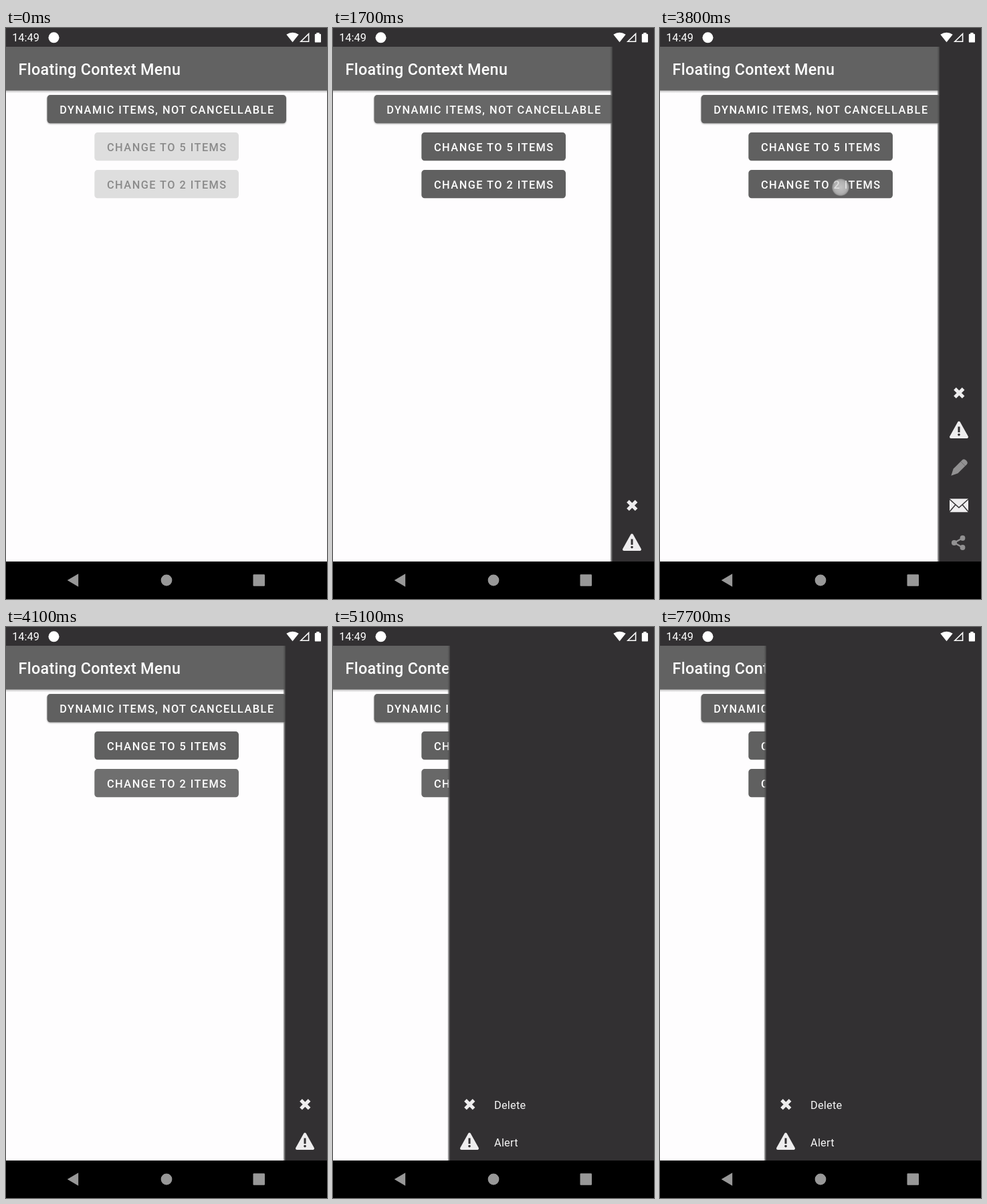
These frames come from a looping animation (480 px wide and 853 px high, 9800 ms). An HTML page:

```html
<!DOCTYPE html>
<html lang="en">
<head>
<meta charset="utf-8">
<title>Floating Context Menu</title>
<style>
  html, body { margin: 0; width: 100%; height: 100%; overflow: hidden; background: #fefdfe; }
  svg { display: block; width: 100vw; height: 100vh; }
  text { font-family: Roboto, "Noto Sans", sans-serif; font-size: 16.33px; fill: #fff; }
  .title { font-size: 23.33px; font-weight: 500; letter-spacing: .0125em; }
  .caption { font-weight: 500; letter-spacing: .0893em; }
  .label { letter-spacing: .015em; fill: #f4f4f4; }
  .face { fill: #606060; filter: drop-shadow(0 1px 1.2px rgba(0, 0, 0, .35)); }
  .light { fill: #eeedee; }
  .dim { fill: #929192; }
  .cut { fill: none; stroke: #323032; }

  .anim { animation: 9800ms step-end infinite; }
  #panel { animation-name: slide; }
  #pair { animation-name: lift; }
  #more { animation-name: reveal; }
  .face.five { animation-name: enable; }
  .face.two { animation-name: enableTwo; }
  .caption.later { animation-name: brighten; }

  /* Each tap starts at --at and repeats once per loop. */
  .dot, .ripple { opacity: 0; animation: dot 9800ms step-end var(--at) infinite; }
  .ripple { fill: #fff; r: 121px; animation-name: ripple; }
  .dot.hold { animation-name: holdDot; }
  .ripple.hold { animation-name: holdRipple; }

  @keyframes slide {
    0% { transform: translateX(483px); }
    15.3% { transform: translateX(455px); }
    16.32% { transform: translateX(424px); }
    17.34% { transform: translateX(416px); }
    48.97% { transform: translateX(380px); }
    50% { transform: translateX(262px); }
    51.02% { transform: translateX(187px); }
    52.04% { transform: translateX(173px); }
    64.28%, 100% { transform: translateX(157px); }
  }
  @keyframes lift {
    0%, 39.79%, 75.51%, 100% { transform: none; }
    29.59%, 64.28% { transform: translateY(-168px); }
  }
  @keyframes reveal {
    0%, 39.79%, 75.51%, 100% { opacity: 0; }
    29.59%, 64.28% { opacity: 1; }
  }
  @keyframes enable {
    0% { fill: #dedede; filter: none; }
    15.3%, 100% { fill: #606060; }
  }
  @keyframes enableTwo {
    0% { fill: #dedede; filter: none; }
    15.3%, 63.26%, 100% { fill: #606060; }
    41.83% { fill: #686868; }
  }
  @keyframes brighten {
    0% { fill: #8a8a8a; }
    15.3%, 100% { fill: #fff; }
  }
  @keyframes dot {
    0% { opacity: 1; }
    2.04%, 100% { opacity: 0; }
  }
  @keyframes ripple {
    0% { opacity: 0; }
    1.02% { opacity: .22; r: 121px; }
    2.04% { opacity: .18; r: 400px; }
    3.06% { opacity: .05; r: 400px; }
    4.08%, 100% { opacity: 0; r: 400px; }
  }
  @keyframes holdDot {
    0% { opacity: 1; }
    2.04%, 100% { opacity: 0; }
  }
  @keyframes holdRipple {
    0% { opacity: .22; r: 121px; }
    2.04% { opacity: .12; r: 400px; }
    3.06%, 100% { opacity: 0; r: 400px; }
  }
</style>
</head>
<body>
<svg viewBox="0 0 480 853" preserveAspectRatio="none">
  <defs>
    <linearGradient id="shade" x2="0" y2="1">
      <stop stop-opacity=".22"/><stop offset="1" stop-opacity="0"/>
    </linearGradient>
    <linearGradient id="edge">
      <stop stop-color="#555" stop-opacity=".25"/>
      <stop offset=".5" stop-color="#505050" stop-opacity=".8"/>
      <stop offset="1" stop-color="#363436"/>
    </linearGradient>
    <radialGradient id="touch">
      <stop stop-color="#dcdcdc" stop-opacity=".8"/>
      <stop offset=".7" stop-color="#d0d0d0" stop-opacity=".72"/>
      <stop offset=".9" stop-color="#b8b8b8" stop-opacity=".7"/>
      <stop offset="1" stop-color="#999" stop-opacity=".3"/>
    </radialGradient>
    <rect id="wide" x="61.5" y="100" width="357.5" height="42.3" rx="4.7"/>
    <rect id="small" x="132.3" y="156" width="215.7" height="42.3" rx="4.7"/>
    <clipPath id="clipWide"><use href="#wide"/></clipPath>
    <clipPath id="clipFive"><use href="#small"/></clipPath>
    <clipPath id="clipTwo"><use href="#small" y="56"/></clipPath>
    <clipPath id="window"><rect y="28" width="480" height="769"/></clipPath>
  </defs>

  <rect width="480" height="853" fill="#fefdfe"/>

  <!-- App bar -->
  <rect y="28" width="480" height="65.5" fill="#626262"/>
  <rect y="93.5" width="480" height="4" fill="url(#shade)"/>
  <text class="title" x="18.6" y="70">Floating Context Menu</text>

  <!-- Buttons -->
  <use class="face" href="#wide"/>
  <g clip-path="url(#clipWide)">
    <circle class="ripple" style="--at:1400ms" cx="239" cy="132"/>
  </g>
  <text class="caption" x="80.2" y="127.7">DYNAMIC ITEMS, NOT CANCELLABLE</text>

  <use class="face five anim" href="#small"/>
  <g clip-path="url(#clipFive)">
    <circle class="ripple hold" style="--at:2900ms" cx="293" cy="190"/>
    <circle class="ripple" style="--at:6200ms" cx="136" cy="185"/>
  </g>
  <text class="caption later anim" x="151" y="183.7">CHANGE TO 5 ITEMS</text>

  <use class="face two anim" href="#small" y="56"/>
  <g clip-path="url(#clipTwo)">
    <circle class="ripple" style="--at:3800ms" cx="270" cy="238"/>
    <circle class="ripple" style="--at:7300ms" cx="136" cy="238"/>
  </g>
  <text class="caption later anim" x="151" y="239.7">CHANGE TO 2 ITEMS</text>

  <!-- Side menu -->
  <g clip-path="url(#window)">
    <g id="panel" class="anim">
      <rect x="1.5" y="28" width="480" height="769" fill="#323032"/>
      <rect x="-1.5" y="28" width="4" height="769" fill="url(#edge)"/>

      <g id="pair" class="anim">
        <g transform="translate(31.3 713.2)">
          <path d="M-6.3-6.3 6.3 6.3M6.3-6.3-6.3 6.3" stroke="#eeedee" stroke-width="5.2"/>
          <text class="label" x="36.7" y="6.3">Delete</text>
        </g>
        <g transform="translate(31 769)">
          <path class="light" d="M0-11.5 12 10H-12Z" stroke="#eeedee" stroke-width="4" stroke-linejoin="round"/>
          <path class="cut" d="M0-5.5V3" stroke-width="3"/>
          <circle cy="6.6" r="1.8" fill="#323032"/>
          <text class="label" x="37" y="6.5">Alert</text>
        </g>
      </g>

      <g id="more" class="anim">
        <g transform="translate(31 657)">
          <g transform="rotate(45)">
            <path class="dim" d="M-4.8-11.5Q-4.8-15.5 0-15.5T4.8-11.5V7L0 16.5-4.8 7Z"/>
            <path class="cut" d="M-4.8-8.5H4.8" stroke-width=".8" opacity=".45"/>
          </g>
          <text class="label" x="37" y="6.5">Edit</text>
        </g>
        <g transform="translate(31 713)">
          <rect class="light" x="-14" y="-9.7" width="28" height="20" rx="1"/>
          <path class="cut" d="M-14-9 0 3.5 14-9M-14 9.5-5-1M14 9.5 5-1" stroke-width="1.5"/>
          <text class="label" x="37" y="6.5">Email</text>
        </g>
        <g transform="translate(31 769)">
          <path d="M5.5-7-7 0 5.5 7" fill="none" stroke="#929192" stroke-width="2.5"/>
          <g class="dim">
            <circle cx="-7" r="4.1"/>
            <circle cx="5.5" cy="-7" r="3.9"/>
            <circle cx="5.5" cy="7" r="3.9"/>
          </g>
          <text class="label" x="37" y="6.5">Share</text>
        </g>
      </g>
    </g>
  </g>

  <!-- Status bar -->
  <rect width="480" height="28" fill="#323032"/>
  <text x="9.2" y="20.3">14:49</text>
  <g fill="#fff">
    <circle cx="71.5" cy="14.3" r="8"/>
    <path d="M428.5 21.3 419.3 9.8Q428.5 3.6 437.7 9.8Z"/>
    <path d="M440.8 20.2 452.6 8.6V20.2Z" fill="none" stroke="#fff" stroke-width="1.6"/>
    <path d="M464.3 8.7V7H468.5V8.7H469.8Q471 8.7 471 9.9V20.4Q471 21.6 469.8 21.6H463Q461.8 21.6 461.8 20.4V9.9Q461.8 8.7 463 8.7Z"/>
  </g>

  <!-- Navigation bar -->
  <rect y="797" width="480" height="56"/>
  <g fill="#989898">
    <path d="M91.7 825 108.2 815.3V834.7Z"/>
    <circle cx="240" cy="825" r="8.4"/>
    <rect x="369.5" y="816.2" width="17.5" height="17.5" rx="1.2"/>
  </g>

  <!-- Touch points -->
  <g fill="url(#touch)">
    <circle class="dot" style="--at:1400ms" cx="239.3" cy="131.7" r="13"/>
    <circle class="dot hold" style="--at:2900ms" cx="293.3" cy="187.5" r="13"/>
    <circle class="dot" style="--at:3800ms" cx="270" cy="238" r="13"/>
    <circle class="dot" style="--at:6200ms" cx="136" cy="185" r="13"/>
    <circle class="dot" style="--at:7300ms" cx="136" cy="238" r="13"/>
  </g>
</svg>
</body>
</html>
```
